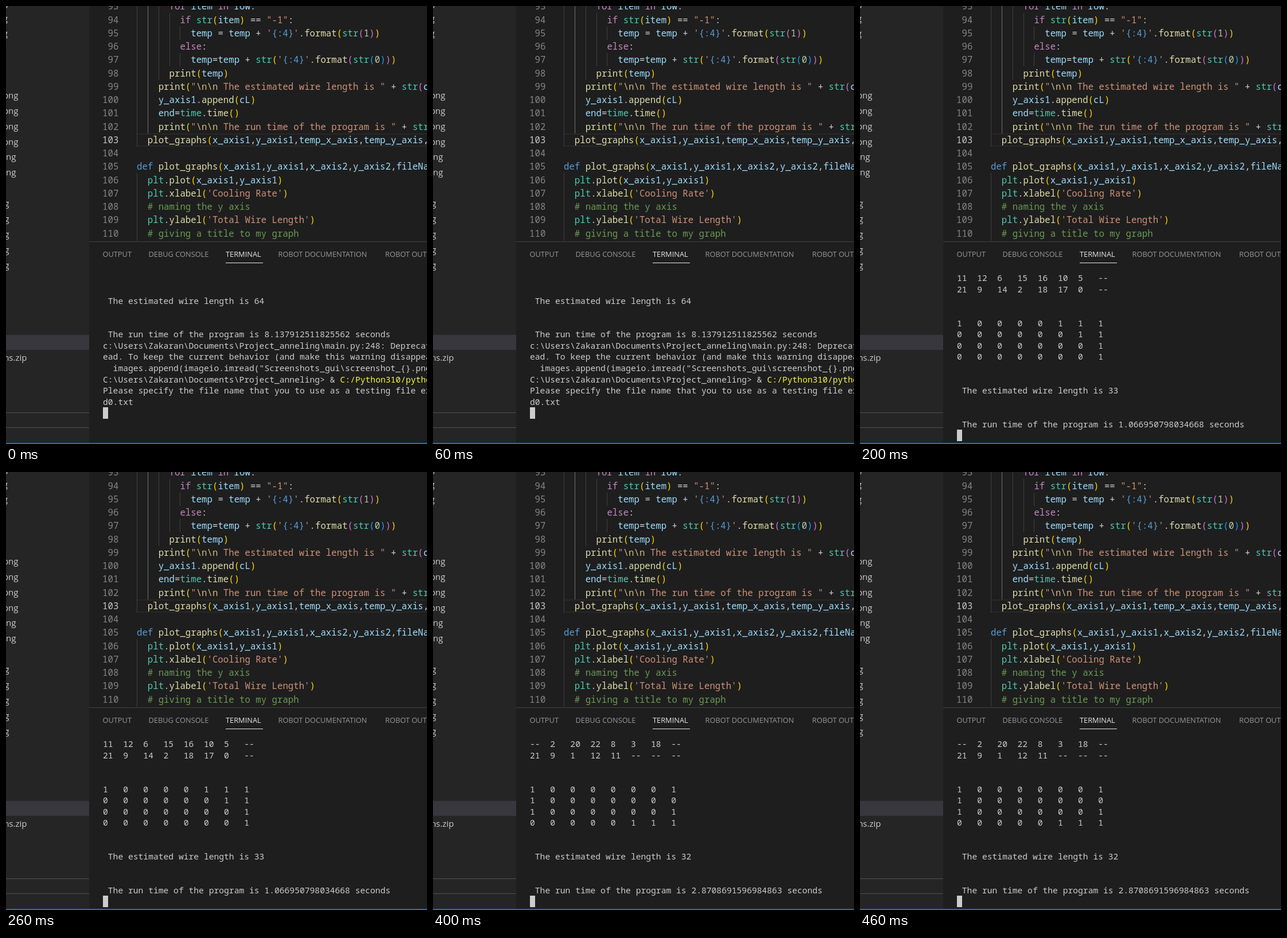
These frames come from a looping animation (734 px wide and 763 px high, 500 ms). An HTML page with a canvas:

```html
<!DOCTYPE html>
<html lang="en">
<head>
<meta charset="utf-8">
<title>Terminal run</title>
<style>
  html, body { margin: 0; width: 100%; height: 100%; overflow: hidden; background: #1e1e1e; }
  canvas { display: block; }
</style>
</head>
<body>
<canvas id="stage" width="734" height="763"></canvas>
<script>
const ctx = document.getElementById("stage").getContext("2d");
const W = 734, H = 763, STEP = 100;
const MONO = '"Noto Sans Mono", "DejaVu Sans Mono", monospace';
const UI = '"Open Sans", "Noto Sans", sans-serif';
const EDITOR = { x: 228, y: 24, first: 94, pitch: 23.25, advance: 9.425, size: 15.71 };
const TERM = { x: 169, y: 474.4, pitch: 19.57, advance: 8.8, size: 14.667 };

const COLOR = {
  plain: "#d4d4d4", name: "#9cdcfe", call: "#dcdcaa", type: "#4ec9b0", flow: "#c586c0",
  keyword: "#569cd6", string: "#ce9178", escape: "#d7ba7d", number: "#b5cea8", comment: "#6a9955"
};
const BRACKETS = ["#ffd700", "#da70d6", "#179fff"];

const CODE = `      for item in row:
        if str(item) == "-1":
          temp = temp + '{:4}'.format(str(1))
        else:
          temp=temp + str('{:4}'.format(str(0)))
      print(temp)
    print("\\n\\n The estimated wire length is " + str(cL))
    y_axis1.append(cL)
    end=time.time()
    print("\\n\\n The run time of the program is " + str(end-start))
  plot_graphs(x_axis1,y_axis1,temp_x_axis,temp_y_axis,fileName)

def plot_graphs(x_axis1,y_axis1,x_axis2,y_axis2,fileName):
  plt.plot(x_axis1,y_axis1)
  plt.xlabel('Cooling Rate')
  # naming the y axis
  plt.ylabel('Total Wire Length')
  # giving a title to my graph`.split("\n");

const HOME = "\\Users\\Zakaran\\Documents\\Project_anneling";
const PROMPT = `C:${HOME}> & `;

const RUNS = [
  { cells: ["20 22 6 1 10 17 0 --", "3 8 15 16 4 5 -- --"],
    bits: ["00000111", "00000011", "00000001", "00000011"], length: 33, time: "0.4697432518005371" },
  { cells: ["11 12 6 15 16 10 5 --", "21 9 14 2 18 17 0 --"],
    bits: ["10000111", "00000011", "00000001", "00000001"], length: 33, time: "1.066950798034668" },
  { cells: ["-- 21 9 3 8 16 4 5", "-- 13 7 1 2 23 19 --"],
    bits: ["11000100", "11000000", "10000000", "10000001"], length: 33, time: "1.776289701461792" },
  { cells: ["-- 2 20 22 8 3 18 --", "21 9 1 12 11 -- -- --"],
    bits: ["10000001", "10000000", "10000001", "00000111"], length: 32, time: "2.8708691596984863" }
];

const lengthLine = n => ` The estimated wire length is ${n}`;
const timeLine = s => ` The run time of the program is ${s} seconds`;
const padCells = list => list.map(v => v.padEnd(4)).join("");

function rect(x, y, w, h, color) {
  ctx.fillStyle = color;
  ctx.fillRect(x, y, w, h);
}

function text(str, x, y, color, align = "left") {
  ctx.fillStyle = color;
  ctx.textAlign = align;
  ctx.fillText(str, x, y);
}

function wordColor(word, next) {
  if (/^(for|in|if|else)$/.test(word)) return COLOR.flow;
  if (word === "def") return COLOR.keyword;
  if (/^(str|plt)$/.test(word) || (word === "time" && next === ".")) return COLOR.type;
  return next === "(" ? COLOR.call : COLOR.name;
}

function stringParts(str) {
  return str.split(/(\\n|\{:4\})/).map(part => [part,
    part === "\\n" ? COLOR.escape : part === "{:4}" ? COLOR.keyword : COLOR.string]);
}

function tokenize(line) {
  let depth = 0;
  const parts = [];
  for (const match of line.matchAll(/#.*|"[^"]*"|'[^']*'|[A-Za-z_]\w*|\d+|\s+|./g)) {
    const token = match[0], next = line[match.index + token.length];
    if (/^["']/.test(token)) parts.push(...stringParts(token));
    else if (token[0] === "#") parts.push([token, COLOR.comment]);
    else if (token === "(") parts.push([token, BRACKETS[depth++ % 3]]);
    else if (token === ")") parts.push([token, BRACKETS[--depth % 3]]);
    else if (/^\d/.test(token)) parts.push([token, COLOR.number]);
    else if (/^\w/.test(token)) parts.push([token, wordColor(token, next)]);
    else parts.push([token, COLOR.plain]);
  }
  return parts;
}

function drawGuides() {
  const guide = (col, from, to, color = "#404040") =>
    rect(Math.round(EDITOR.x + col * EDITOR.advance), from, 1, to - from, color);
  guide(0, 0, 245);
  guide(0, 291, 409);
  guide(2, 0, 222, "#707070");
  guide(4, 0, 129);
  guide(6, 12, 105);
  guide(8, 36, 59);
  guide(8, 82, 105);
}

function drawEditor() {
  rect(EDITOR.x, 222, W - EDITOR.x, 2, "#282828");
  rect(EDITOR.x, 243, W - EDITOR.x, 2, "#282828");
  drawGuides();
  ctx.font = `${EDITOR.size}px ${MONO}`;
  CODE.forEach((line, i) => {
    const number = EDITOR.first - 1 + i;
    const y = EDITOR.y + (i - 1) * EDITOR.pitch + 5.5;
    text(number, 196.3, y, number === 103 ? "#c6c6c6" : "#858585", "right");
    let col = 0;
    for (const [token, color] of tokenize(line)) {
      text(token, EDITOR.x + col * EDITOR.advance, y, color);
      col += token.length;
    }
  });
}

function drawSidebar() {
  rect(0, 0, 145, H, "#252526");
  rect(0, 573, 145, 26, "#37373d");
  rect(0, 708, 145, 1, "#505051");
  rect(0, 734, 145, 1, "#505051");
  ctx.font = `15px ${UI}`;
  const label = (row, right, name = "png") =>
    text(name, right, 160.9 + row * 26.88, "#cccccc", "right");
  for (let row = -6; row <= -4; row++) label(row, 3);
  for (let row = 0; row <= 5; row++) label(row, row < 4 ? 21.5 : 17.5);
  for (let row = 7; row <= 11; row++) label(row, 5.5);
  label(17, 36.5, "ns.zip");
}

function drawTabs() {
  rect(145, 410, W - 145, 1, "#424242");
  ctx.font = `12.8px ${UI}`;
  const tab = (name, x, color = "#979797") => text(name, x, 436.7, color);
  tab("OUTPUT", 168.5);
  tab("DEBUG CONSOLE", 248.5);
  tab("TERMINAL", 383, "#e7e7e7");
  tab("ROBOT DOCUMENTATION", 474.5);
  tab("ROBOT OUTPUT", 661);
  rect(383, 447, 65, 1, "#e7e7e7");
}

function termLine(row, str, col = 0, color = "#cccccc") {
  text(str, TERM.x + col * TERM.advance, TERM.y + row * TERM.pitch + 5, color);
}

function cursor(row) {
  rect(TERM.x, Math.round(TERM.y + row * TERM.pitch - 10), 9, 20, "#cccccc");
}

function drawPrompt() {
  termLine(2, lengthLine(64));
  termLine(5, timeLine("8.137912511825562"));
  termLine(6, `c:${HOME}\\main.py:248: DeprecationWarning`);
  termLine(7, "ead. To keep the current behavior (and make this warning disappear");
  termLine(8, '  images.append(imageio.imread("Screenshots_gui\\screenshot_{}.png"');
  termLine(9, PROMPT);
  termLine(9, "C:/Python310/python.exe", PROMPT.length, "#f5f543");
  termLine(10, "Please specify the file name that you to use as a testing file ex");
  termLine(11, "d0.txt");
  cursor(12);
}

function drawRun(run) {
  run.cells.forEach((line, i) => termLine(i, padCells(line.split(" "))));
  run.bits.forEach((line, i) => termLine(4 + i, padCells([...line])));
  termLine(10, lengthLine(run.length));
  termLine(13, timeLine(run.time));
  cursor(14);
}

function draw() {
  const step = Math.floor(performance.now() / STEP) % (RUNS.length + 1);
  rect(0, 0, W, H, "#1e1e1e");
  drawEditor();
  drawSidebar();
  drawTabs();
  ctx.font = `${TERM.size}px ${MONO}`;
  if (step === 0) drawPrompt();
  else drawRun(RUNS[step - 1]);
  rect(0, 761, W, 2, "#007acc");
  requestAnimationFrame(draw);
}

draw();
</script>
</body>
</html>
```
